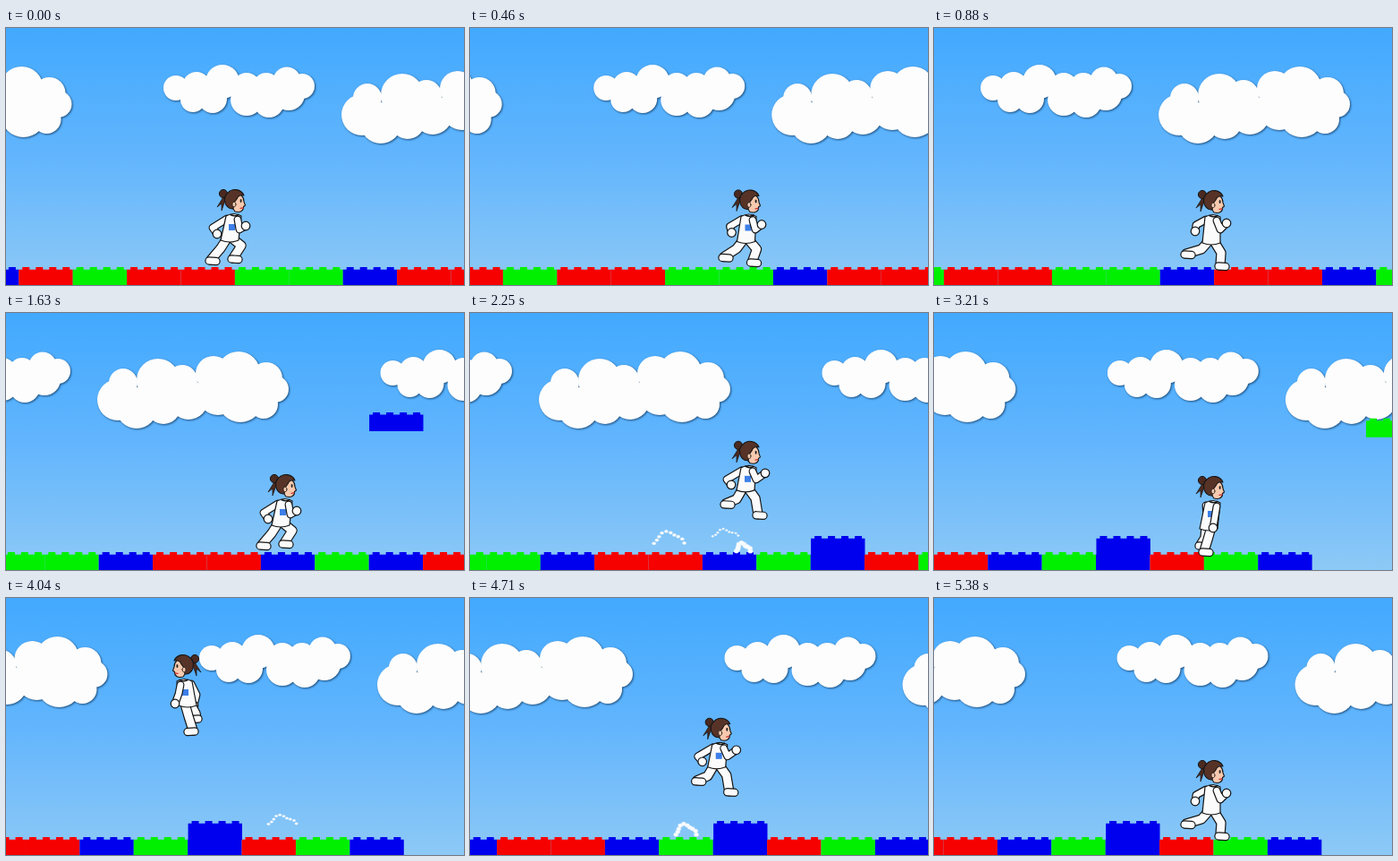
An HTML page that plays this animation: 512 by 287 pixels, repeating every 5.43 s.

```html
<!DOCTYPE html>
<html lang="en">
<head>
<meta charset="utf-8">
<title>Brick runner</title>
<style>
  html, body { margin: 0; width: 100%; height: 100%; overflow: hidden; background: #5cb3fd; }
  svg { display: block; width: 100vw; height: 100vh; }
  .cloud { fill: #fdfdfd; filter: drop-shadow(1px 1.5px 1.2px rgba(10, 45, 80, .75)); }
</style>
</head>
<body>
<svg viewBox="0 0 512 287" preserveAspectRatio="none">
  <defs>
    <linearGradient id="sky" x2="0" y2="1">
      <stop offset="0" stop-color="#42a9fe"/>
      <stop offset=".5" stop-color="#62b5fd"/>
      <stop offset="1" stop-color="#8dc9f6"/>
    </linearGradient>
  </defs>
  <rect width="512" height="287" fill="url(#sky)"/>
  <g id="clouds"></g>
  <g id="world">
    <g id="ground"></g>
    <g id="fallers"></g>
    <g id="dust"></g>
    <g id="player" stroke-linejoin="round" stroke-linecap="round"></g>
  </g>
</svg>
<script>
const LOOP = 5430, STEP = 1000 / 24, LAST = 129;
const TILE = 515.5, BRICK = 60.4, FLOOR = 271;
const byId = id => document.getElementById(id);
const clamp = (v, lo, hi) => Math.max(lo, Math.min(hi, v));
const mix = (a, b, u) => a + (b - a) * u;

// ---- Scenery ----
const longCloud = [[190,67,14],[213,65,16],[242,60,19],[269,66,16],[291,65,15],[314,59,15.5],
  [331,65,14],[209,80,14],[231,79,16],[269,80,18],[294,83,17],[316,74,18]];
const bigCloud = [[398,97,23],[404,78,16],[443,75,24],[470,75,17],[505,68,20],[533,67,24],
  [564,73,18],[574,85,15],[419,106,23],[449,105,19],[477,97,22],[510,91,23],[535,97,25],[561,102,16]];

function cloud(circles, offset) {
  return `<g class="cloud">${circles.map(([x, y, r]) =>
    `<circle cx="${x + offset}" cy="${y}" r="${r}"/>`).join('')}</g>`;
}

function brick(x, y, color) {
  let d = `M${x} ${y + 2.7}h${BRICK}v18.3h${-BRICK}z`;
  for (let i = 0; i < 4; i++) d += `M${x + 4 + i * 15} ${y}h8v3h-8z`;
  return `<path d="${d}" fill="${color}"/>`;
}

const COLORS = { r: '#f60000', g: '#00f000', b: '#0000ee' };
byId('clouds').innerHTML = [-1, 0, 1, 2].map(i =>
  cloud(longCloud, i * TILE) + cloud(bigCloud, i * TILE)).join('');
byId('ground').innerHTML = [...'brgrrggbrrbgbrgb'].map((c, i) =>
  brick(14.3 + (i - 1) * BRICK, 267, COLORS[c])).join('');

// ---- Motion ----
// [time, world x] of the runner, linear in between
const route = [[0, 248], [880, 430], [1596, 578], [1640, 578], [1886, 527], [2250, 603],
  [3210, 803], [3326, 827], [4372, 610], [5250, 792], [LOOP, 792]];
// [start, duration, height]
const jumps = [[2163, 1000, 117], [3533, 1014, 117], [4547, 620, 60]];
// [start, world x]
const puffs = [[1640, 583], [1886, 520], [2163, 603], [3326, 832], [3533, 784], [4547, 648]];

// The camera moves only when the runner leaves the band 203..305
function locate(t) {
  let cam = 0, facing = 1;
  const follow = x => clamp(cam, x - 305, x - 203);
  for (let i = 1; i < route.length; i++) {
    const [t0, x0] = route[i - 1], [t1, x1] = route[i];
    if (x1 !== x0) facing = Math.sign(x1 - x0);
    if (t < t1) {
      const x = mix(x0, x1, (t - t0) / (t1 - t0));
      return { x, cam: follow(x), facing };
    }
    cam = follow(x1);
  }
}

// ---- Runner ----
// head, hip, then back elbow/hand, front elbow/hand, back knee/foot, front knee/foot
const POSES = {
  push: [10,-78, 2,-36, -17,-48, -12,-41, 13,-46, 20,-50, -8,-25, -19,-12, 15,-28, 6,-14],
  stride: [10,-77, 5,-33, -12,-51, -13,-44, 15,-46, 22,-53, -6,-24, -23,-19, 16,-20, 15,-6],
  pass: [10,-76, 2,-32, 0,-45, 3,-34, 9,-43, 7,-31, -2,-20, -7,-12, 1,-18, -3,-5],
  leap: [10,-78, 3,-38, -18,-48, -13,-42, 15,-48, 25,-55, -7,-26, -19,-21, 14,-27, 17,-9],
  fall: [7,-78, 0,-36, -10,-46, -7,-34, 10,-47, 14,-36, -9,-25, -10,-20, -1,-22, -6,-6]
};
const blend = (a, b, u) => POSES[a].map((v, i) => mix(v, POSES[b][i], clamp(u, 0, 1)));
const cycle = [[0, 'push'], [3, 'push'], [5, 'pass'], [6, 'pass'], [8, 'stride'], [10, 'stride'], [12, 'push']];

function runPose(frame) {
  const phase = frame % 12, i = cycle.findIndex(([at]) => at > phase);
  const [t0, a] = cycle[i - 1], [t1, b] = cycle[i];
  return blend(a, b, (phase - t0) / (t1 - t0));
}

const INK = '#151515', SUIT = '#fbfbfb';
const shape = (d, fill, width = 1.1) =>
  `<path d="${d}" fill="${fill}" stroke="${INK}" stroke-width="${width}"/>`;
const tube = (d, width) =>
  `<path d="${d}" fill="none" stroke="${INK}" stroke-width="${width + 2.4}"/>` +
  `<path d="${d}" fill="none" stroke="${SUIT}" stroke-width="${width}"/>`;
const arm = (x, y, ex, ey, hx, hy) => tube(`M${x} ${y}L${ex} ${ey}L${hx} ${hy}`, 6.5) +
  `<circle cx="${hx}" cy="${hy}" r="4.8" fill="${SUIT}" stroke="${INK}" stroke-width="1.2"/>`;
const leg = (x, y, kx, ky, fx, fy) => tube(`M${x} ${y}L${kx} ${ky}L${fx} ${fy}`, 9) +
  tube(`M${fx - 2} ${fy + 1}L${fx + 6} ${fy + 1.5}`, 7);

const HEAD =
  shape('M-14 -6L-22 7L-17 3L-17 11L-12 -3', '#4a2a20', .7) +
  '<circle cx="-15" cy="-8" r="4.6" fill="#4a2a20" stroke="#151515"/>' +
  shape('M-4 -8C4 -10 8 -4 8 1L9.5 5L7.5 6.5C8 11 4 13.5 -2 12L-6 6Z', '#f7c9ae') +
  shape('M-5 9C-14 8 -16 -4 -10 -9C-5 -14.5 5 -13.5 8 -6C4 -7 1 -5 0 -2L-3 2L-4 9Z', '#573327') +
  '<ellipse cx="-3" cy="4" rx="2" ry="2.8" fill="#f7c9ae" stroke="#151515" stroke-width=".7"/>' +
  '<ellipse cx="4.6" cy="0" rx="1" ry="2" fill="#222"/>' +
  '<path d="M4 8.3L7 7.8" stroke="#c33" stroke-width="1.2"/>';

function figure(p, badge) {
  const [hx, hy, px, py] = p;
  const limb = (draw, x, y, i) => draw(x, y, p[i], p[i + 1], p[i + 2], p[i + 3]);
  const sx = hx - 6, top = hy + 16;
  return limb(arm, sx - 5, top + 4, 4) +
    limb(leg, px - 3, py, 12) + limb(leg, px + 3, py, 16) +
    shape(`M${sx - 6} ${top + 1}Q${sx + 3} ${top - 4} ${sx + 11} ${top + 1}L${px + 10} ${py + 2}Q${px} ${py + 6} ${px - 10} ${py + 2}Z`, SUIT, 1.2) +
    (badge ? `<rect x="${px - 1}" y="${top + 10}" width="7" height="7" fill="#3d7fe8"/>` : '') +
    limb(arm, sx + 7, top + 5, 8) +
    `<path d="M${sx - 1} ${top - .5}Q${sx + 4} ${top + 2} ${sx + 8} ${top - .5}" fill="none" stroke="${INK}" stroke-width="1.6"/>` +
    `<g transform="translate(${hx} ${hy})">${HEAD}</g>`;
}

// Specks that open from a blob into a thinning arc
function puff(age, x) {
  const u = age / 640;
  if (u < 0 || u > 1) return '';
  const radius = 3 + 14 * Math.min(1, u * 2.2), span = 1.8 - .9 * u;
  let out = '';
  for (let i = 0; i < 10; i++) {
    const angle = mix(-span, span, i / 9), r = radius + 1.5 * Math.sin(i * 5);
    out += `<ellipse cx="${x + r * Math.sin(angle)}" cy="${266 - 7 * u - r * Math.cos(angle)}" ` +
      `rx="${mix(3, 1.4, u)}" ry="${mix(2.6, .9, u)}" transform="rotate(0)"/>`;
  }
  return `<g fill="#fff" stroke="#d5e8f6" stroke-width=".4">${out}</g>`;
}

function render(time) {
  const frame = Math.min(LAST, Math.floor((time + 2.5) / STEP)), t = frame * STEP;
  const { x, cam, facing } = locate(t);
  const scroll = `translate(${-cam} 0)`;
  byId('clouds').setAttribute('transform', scroll);
  byId('world').setAttribute('transform', scroll);

  byId('fallers').innerHTML =
    brick(679.1, Math.min(249, 112 + .225 * (t - 1630)), COLORS.b) +
    brick(980.7, 118 + .225 * (t - 3210), COLORS.g);
  byId('dust').innerHTML = puffs.map(([at, px]) => puff(t - at, px)).join('');

  const jump = jumps.find(([at, length]) => t >= at && t < at + length);
  let lift = 0, pose = runPose(frame);
  if (jump) {
    const u = (t - jump[0]) / jump[1];
    lift = 4 * jump[2] * u * (1 - u);
    pose = blend('leap', 'fall', (u - .3) / .18);
  }
  const phase = frame % 12, badge = jump || phase < 7 || phase > 10;
  const player = byId('player');
  player.innerHTML = figure(pose, badge);
  player.setAttribute('transform', `translate(${x} ${FLOOR - lift}) scale(${facing} 1)`);
}

const start = performance.now();
function tick() {
  render((performance.now() - start) % LOOP);
  requestAnimationFrame(tick);
}
tick();
</script>
</body>
</html>
```
